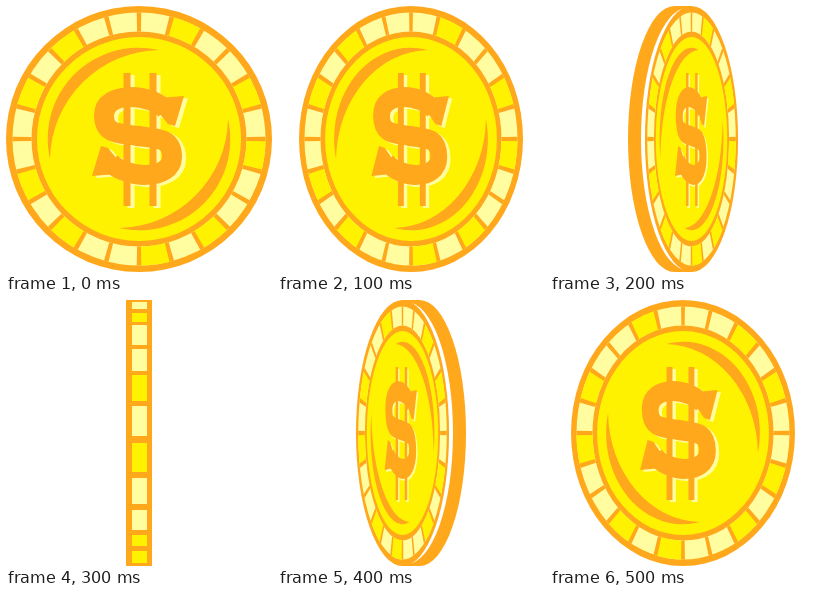
Write an HTML page that moves like this. It is 266x266 px and loops after 0.6 s.

```html
<!DOCTYPE html>
<html lang="en">
<head>
<meta charset="utf-8">
<title>Spinning coin</title>
<style>
  html, body { margin: 0; width: 100%; height: 100%; overflow: hidden; background: #fff; }
  .strip { display: block; width: 1596px; height: 266px; animation: spin 600ms steps(6) infinite; }
  @keyframes spin { to { transform: translateX(-1596px); } }
  .gold { fill: #ffa81c; }
  .yellow { fill: #fff200; }
  .pale { fill: #fffda0; }
  .ring { fill: none; stroke-width: 19; }
  .sign path { fill: none; stroke: currentColor; }
  .sign polygon { fill: currentColor; }
</style>
</head>
<body>
<svg class="strip" viewBox="0 0 1596 266">
  <defs>
    <!-- all coin parts are centred on 0,0 -->
    <path id="shine" class="gold" d="M-89 20A91 91 0 0 1 20 -89A111 111 0 0 0 -89 20Z"/>

    <g id="face">
      <circle class="gold" r="133"/>
      <g class="ring" transform="rotate(-90)">
        <circle r="117" stroke="#fffda0"/>
        <circle r="117" stroke="#fff200" pathLength="24"
          stroke-dasharray="0 1 1 2 1 1 1 2 1 1 1 2 1 1 1 2 1 1 1 2"/>
        <circle r="117" stroke="#ffa81c" pathLength="24"
          stroke-dasharray=".14 .86" stroke-dashoffset=".07"/>
      </g>
      <circle class="yellow" r="102"/>
      <use href="#shine"/>
      <use href="#shine" transform="rotate(180)"/>
    </g>

    <!-- the S is one half, repeated upside down -->
    <g id="half" class="sign">
      <path stroke-width="20" d="M27 -29C12 -46 -35 -48 -35 -24C-35 -4 -20 -6 -1 -3L1 -2.7"/>
      <polygon points="20,-41 45,-43 36,-13 29,-15 20,-26"/>
    </g>
    <g id="sign" class="sign">
      <path stroke-width="7" d="M-12 -66V67M14 -66V67"/>
      <use href="#half"/>
      <use href="#half" transform="rotate(180 -1 -3)"/>
    </g>
    <g id="dollar">
      <use href="#sign" color="#fffda0" x="4" y="2"/>
      <use href="#sign" color="#ffa81c"/>
    </g>

    <g id="front">
      <use href="#face"/>
      <use href="#dollar"/>
    </g>
    <g id="back">
      <use href="#face" transform="scale(-1 1)"/>
      <use href="#dollar" x="-4"/>
    </g>

    <!-- thick rim seen to the left of a tilted face -->
    <g id="rim">
      <ellipse class="gold" cx="-17" rx="46.5" ry="133"/>
      <rect class="gold" x="-17" y="-133" width="17" height="266"/>
      <ellipse fill="#fff" cx="-4" rx="46.5" ry="131"/>
    </g>

    <g id="edge">
      <rect class="gold" x="-13" y="-133" width="26" height="266"/>
      <path class="pale" d="M-7 -131h15v7h-15zM-7 -108h15v20h-15zM-7 -84h15v22h-15zM-7 -27h15v30h-15zM-7 45h15v26h-15zM-7 77h15v20h-15z"/>
      <path class="yellow" d="M-7 -120h15v9h-15zM-7 -58h15v26h-15zM-7 10h15v29h-15zM-7 102h15v11h-15zM-7 118h15v12h-15z"/>
    </g>
  </defs>

  <g transform="translate(133 133)">
    <use href="#front"/>
    <use href="#front" transform="translate(266) scale(.842 1)"/>
    <g transform="translate(540.5)">
      <use href="#rim"/>
      <use href="#front" transform="scale(.35 1)"/>
    </g>
    <use href="#edge" x="798"/>
    <g transform="translate(1055.5)">
      <use href="#rim" transform="scale(-1 1)"/>
      <use href="#back" transform="scale(.35 1)"/>
    </g>
    <use href="#back" transform="translate(1330) scale(.842 1)"/>
  </g>
</svg>
</body>
</html>
```
